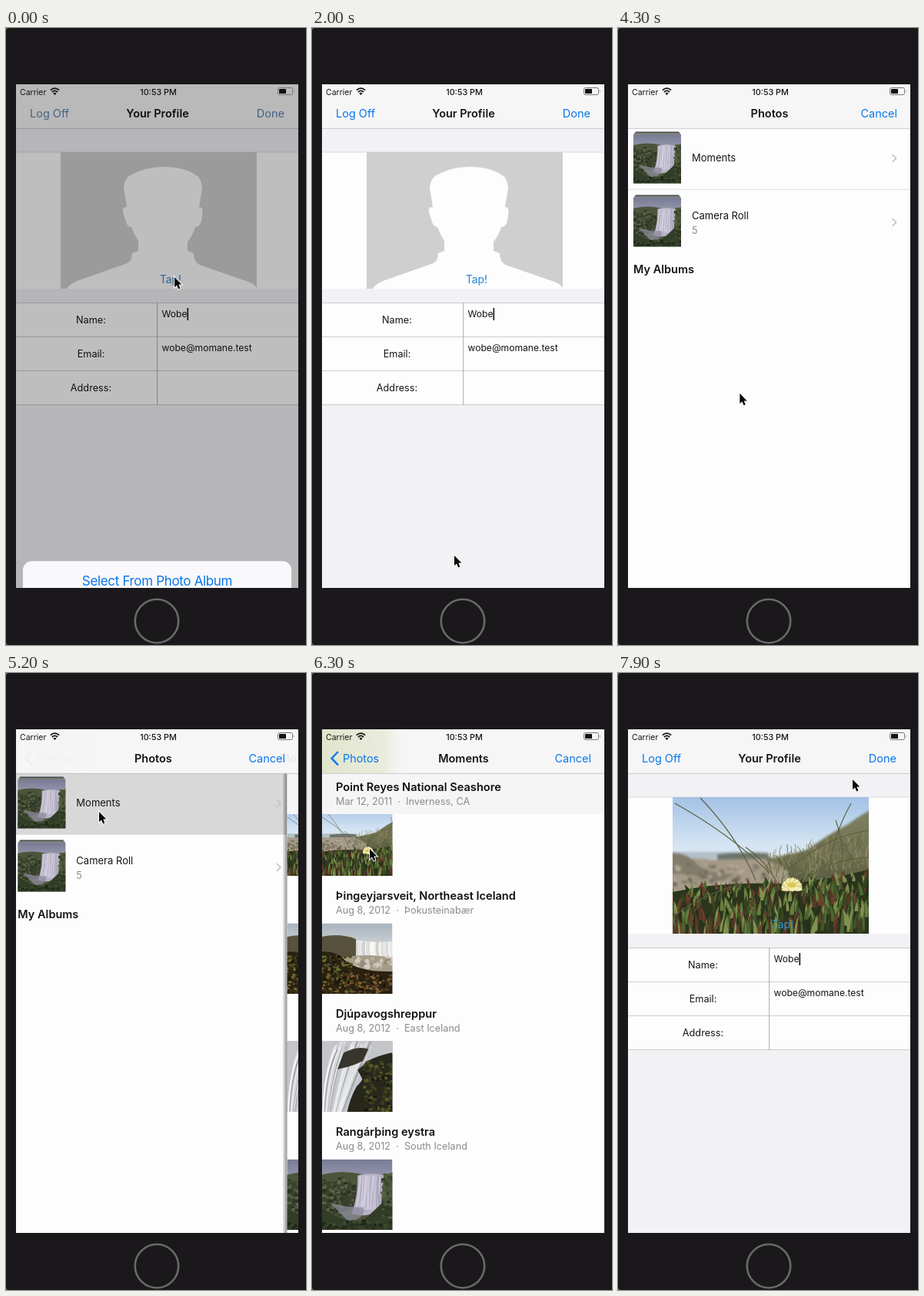
Write an HTML page that moves like this. It is 390 px wide and 800 px high and loops after 8000 ms.

```html
<!DOCTYPE html>
<html lang="en">
<head>
<meta charset="utf-8">
<title>Profile photo picker</title>
<style>
html, body { margin: 0; width: 100%; height: 100%; overflow: hidden; background: #1a181a; }
svg { display: block; }
text { font-family: Inter, Roboto, sans-serif; white-space: pre; }
</style>
</head>
<body>
<svg id="stage" width="390" height="800" viewBox="0 0 390 800" xmlns="http://www.w3.org/2000/svg"></svg>
<script>
const LOOP = 8000, STEP = 100;
const BLUE = '#0877ec', INK = '#151515', GREY = '#8b8a8e';

// ---- markup helpers ----
const rect = (x, y, w, h, fill, more = '') =>
  `<rect x="${x}" y="${y}" width="${w}" height="${h}" fill="${fill}" ${more}/>`;
const path = (d, fill, more = '') => `<path d="${d}" fill="${fill}" ${more}/>`;
const line = (d, stroke, width = 1, more = '') =>
  path(d, 'none', `stroke="${stroke}" stroke-width="${width}" ${more}`);
const text = (x, y, size, str, fill = INK, more = '') =>
  `<text x="${x}" y="${y}" font-size="${size}" fill="${fill}" ${more}>${str}</text>`;
const use = (id, x, y, w, h) => `<use href="#${id}" x="${x}" y="${y}" width="${w}" height="${h}"/>`;
const gradient = (id, ...colors) => `<linearGradient id="${id}" x2="0" y2="1">` +
  colors.map((c, i) => `<stop offset="${i / (colors.length - 1)}" stop-color="${c}"/>`).join('') +
  '</linearGradient>';
const blur = (id, size) => `<filter id="${id}"><feGaussianBlur stdDeviation="${size}"/></filter>`;
const soft = (id, body) => `<g filter="url(#${id})">${body}</g>`;
const picture = (id, w, h, body) =>
  `<symbol id="${id}" viewBox="0 0 ${w} ${h}" preserveAspectRatio="xMidYMid slice">${body}</symbol>`;
const MID = 'text-anchor="middle" ', END = 'text-anchor="end" ', BOLD = 'font-weight="600" ';

let seed = 7;
const rnd = (lo = 0, hi = 1) => {
  seed = (seed * 16807) % 2147483647;
  return lo + (hi - lo) * seed / 2147483647;
};
const pick = list => list[Math.floor(rnd() * list.length)];
const many = (n, make) => Array.from({ length: n }, (_, i) => make(i)).join('');
const num = v => v.toFixed(1);
const speckle = (n, x, y, w, h, size, colors) => many(n, () =>
  `<ellipse cx="${num(x + rnd() * w)}" cy="${num(y + rnd() * h)}" rx="${num(rnd(.4, 1) * size)}"` +
  ` ry="${num(rnd(.3, .8) * size)}" fill="${pick(colors)}"/>`);

// ---- pictures ----
function beach() {
  const leaves = ['#4c6630', '#34451f', '#687f3f', '#5c3627', '#262f17', '#6b402c', '#41552a', '#838f50'];
  const spike = i => {
    const x = rnd(-5, 260), v = i / 420;
    const y = 122 - x * .07 + v * 72, h = rnd(8, 14) + v * 14, lean = rnd(-5, 6), w = rnd(1.2, 2.8);
    return path(`M${num(x - w)} ${num(y)}Q${num(x - w)} ${num(y - h / 2)} ${num(x + lean)} ${num(y - h)}` +
      `Q${num(x + w + 1)} ${num(y - h / 2)} ${num(x + w)} ${num(y)}Z`, pick(leaves));
  };
  const tuft = () => {
    const x = rnd(125, 255), y = rnd(80, 118) - (x - 125) * .2;
    return line(`M${num(x)} ${num(y)}q${num(rnd(-5, 2))} -8 ${num(rnd(-9, 10))} ${num(rnd(-19, -7))}`,
      pick(['#757854', '#a39c74', '#565c3c', '#8b8a63']), .8);
  };
  const petals = many(14, i => `<ellipse cx="155" cy="110" rx="3" ry="9" fill="${i % 2 ? '#f3efb6' : '#ddd78c'}"` +
    ` transform="translate(0 3) rotate(${-98 + i * 15} 155 115)"/>`);
  const blades = ['M3 8Q75 48 126 98', 'M36 1Q85 52 108 108', 'M255 43Q196 52 151 94', 'M232 8Q207 52 203 100',
    'M255 78Q190 82 160 120', 'M95 65Q125 85 140 120', 'M212 30Q225 65 218 105', 'M0 155Q40 125 92 112'];
  return rect(0, 0, 255, 177, 'url(#sky)') + soft('haziness',
    rect(-5, 71, 130, 9, '#b3c0c9') + path('M58 74Q85 70 125 73V82H58Z', '#6d766c') +
    path('M95 84Q140 78 175 68Q203 48 228 35Q246 22 262 14V145H95Z', 'url(#dune)') +
    path('M-5 82Q25 77 52 81L120 80L150 95V140H-5Z', '#a59a88') +
    path('M-5 72Q18 71 30 85T80 100L60 112Q25 96 -5 100Z', '#817b6b') +
    speckle(70, 0, 84, 120, 38, 4, ['#b9ad99', '#878070', '#716e58', '#aa9f8c', '#5f6147'])) +
    many(170, tuft) + soft('focus',
    path('M-5 124Q60 110 120 112T262 92V182H-5Z', '#2b341d') + many(420, spike)) +
    blades.map(d => line(d, '#5a5d3c', 1.1)).join('') +
    petals + '<ellipse cx="155" cy="114" rx="6" ry="3.5" fill="#e0c858"/>';
}

const cascade = () => rect(0, 0, 91, 91, 'url(#haze)') + soft('focus',
  path('M-3 18Q22 12 43 20L48 26L47 48H-3Z', '#57513d') +
  path('M44 22Q68 26 94 23V46Q65 42 44 46Z', '#f0efec') +
  many(22, () => line(`M${num(rnd(46, 90))} 24q-2 9 1 20`, pick(['#ffffff', '#d8d9d8', '#c2c5c3']), 1)) +
  path('M25 44Q60 38 94 45V66H25Z', '#a69d88') +
  speckle(30, 40, 43, 50, 14, 4, ['#d0cbbf', '#b7af9b', '#958d79']) +
  path('M-3 37Q18 34 30 48Q50 64 94 62V94H-3Z', '#2b2112') +
  speckle(170, 0, 42, 38, 49, 2.6, ['#5d4d25', '#7d6834', '#3d3416', '#19150d', '#656e2f', '#444a20']) +
  speckle(130, 30, 65, 61, 26, 2.6, ['#6a4726', '#3b2815', '#836133', '#1a140c', '#4d4420']));

const rapids = () => rect(0, 0, 91, 91, '#26261d') + soft('focus',
  path('M-4 -4H55Q70 4 95 -2V14Q60 20 46 36Q60 45 45 58Q35 75 32 95H-4Z', '#c3c5c8') +
  many(48, () => {
    const x = rnd(0, 50);
    return line(`M${num(x + 15)} ${num(rnd(-4, 12))}Q${num(x)} 38 ${num(x * .55)} 95`,
      pick(['#f3f4f6', '#dadde1', '#8f9398', '#ffffff']), num(rnd(.7, 2.2)), 'opacity=".65"');
  }) +
  path('M28 15Q46 5 60 10L53 25Q38 33 20 36Z', '#37352c') +
  path('M46 37Q66 20 95 15V95H36Q41 65 54 52Z', '#27271b') +
  speckle(130, 54, 26, 41, 67, 3.4, ['#42411f', '#565728', '#171811', '#302d20', '#3a3d25']));

const falls = () => rect(0, 0, 91, 91, 'url(#dusk)') + soft('focus',
  path('M-4 21Q24 13 50 19T95 15V95H-4Z', '#4c553b') +
  path('M-4 30Q25 26 44 33L46 60L24 74L-4 62Z', '#3b432f') +
  speckle(110, 0, 24, 42, 48, 3.5, ['#4f5a3b', '#37402b', '#5b6445', '#2a3222']) +
  path('M46 21Q62 16 80 21Q78 42 75 66Q58 76 38 70Q47 48 46 21Z', '#b6b1c5') +
  many(30, () => line(`M${num(rnd(49, 77))} 21q-1 20 ${num(rnd(-7, 1))} 44`,
    pick(['#dedae8', '#9f9bb1', '#cbc7d8']), 1.4, 'opacity=".7"')) +
  path('M10 56Q28 62 54 62Q56 78 34 80Z', '#8e8b9c', 'opacity=".75"') +
  path('M-4 60Q26 82 52 80Q68 66 78 56L95 50V95H-4Z', '#323d28') +
  speckle(60, 78, 18, 16, 60, 3.2, ['#4f5b3d', '#39452c', '#5c6746', '#2b3622']) +
  speckle(60, 0, 80, 91, 12, 3.5, ['#263020', '#3c4a2b', '#1f2719']));

// ---- screens ----
const navBar = rect(13, 73, 368, 57, '#f7f6f7') + line('M13 130.3H381', '#bdbcbf', .8);
const silhouette = path('M79 338Q82 332 95 327L155 306Q164 304 164 292L172 289V276Q166 267 163 258Q157 258 155 248' +
  'Q150 235 153 233L157 232L153 207Q154 196 160 192Q180 180 204 180Q234 180 250 193Q254 197 255 208L251 232' +
  'Q257 232 255 243Q254 258 246 258Q243 269 236 277V289L244 292Q244 305 254 308L315 329Q325 333 326 338Z', '#fefdfe');

const profile = () => rect(13, 73, 368, 653, '#f2f1f4') + navBar +
  text(31, 116, 14.5, 'Log Off', BLUE, 'class="tint"') +
  text(197, 116, 14.5, 'Your Profile', INK, MID + BOLD) +
  text(362, 116, 14.5, 'Done', BLUE, 'class="tint" ' + END) +
  rect(13, 161, 368, 177, '#fefdfe') + line('M13 161H381', '#d2d1d5', .8) +
  rect(71, 161, 255, 177, '#d0cfd0') + silhouette +
  `<g id="chosen">${use('beach', 71, 161, 255, 177)}</g>` +
  text(214, 331, 13.8, 'Tap!', '#1f85db', 'id="tap" ' + MID) +
  rect(13, 356, 368, 132, '#fefdfe') +
  [356, 400, 444, 488].map(y => line(`M13 ${y + .5}H381`, '#cccbcf')).join('') +
  line('M196.7 356V489', '#aaa9ad') +
  ['Name:', 'Email:', 'Address:'].map((s, i) => text(110.5, 383 + i * 44.2, 12.7, s, INK, MID)).join('') +
  text(202.5, 375, 12.1, 'Wobe') + text(202.5, 419, 12.1, 'wobe@momane.test') +
  rect(235.5, 363, 1.6, 16, '#111', 'id="caret"');

const albumThumb = y => rect(22.5, y - 3.5, 57, 1.4, '#3b3d46') + rect(21, y - 1.8, 60, 1.5, '#555c4a') +
  use('falls', 20, y, 62, 63.5);
const chevron = y => line(`M356.5 ${y - 5}l5 5l-5 5`, '#c2c1c6', 1.7);
const albums = () => rect(13, 130, 368, 596, '#fefdfe') +
  rect(13, 130, 371, 79, '#d9d8d9', 'id="pressed"') +
  albumThumb(138) + text(96, 173, 13, 'Moments') + chevron(169) +
  line('M13 209.3H381', '#d9d8dc', .8) +
  albumThumb(220) + text(96, 248, 13, 'Camera Roll') + text(96, 267, 12.6, '5', GREY) + chevron(252) +
  text(20, 318, 14.5, 'My Albums', INK, BOLD);

const SECTIONS = [
  ['Point Reyes National Seashore', 'Mar 12, 2011', 'Inverness, CA', 'beach'],
  ['Þingeyjarsveit, Northeast Iceland', 'Aug 8, 2012', 'Þokusteinabær', 'cascade'],
  ['Djúpavogshreppur', 'Aug 8, 2012', 'East Iceland', 'rapids'],
  ['Rangárþing eystra', 'Aug 8, 2012', 'South Iceland', 'falls'],
];
const moments = () => many(14, i => rect(13 - i / 2, 130, .6, 596, '#000', `opacity="${num(.4 - i * .03)}"`)) +
  rect(13, 130, 368, 596, '#fefdfe') +
  SECTIONS.map(([title, date, place, art], i) => {
    const top = i ? 118 + i * 153 : 130;
    return use(art, 13, 171.5 + i * 153, 91.5, 91.5) +
      (i ? '' : rect(13, 130, 368, 53, '#f6f5f6')) +
      text(31, top + 23, 14.6, title, '#111', BOLD) +
      text(31, top + 41, 12.7, `${date}\u00a0\u00a0·\u00a0\u00a0${place}`, GREY);
  }).join('');

const pickerNav = () => navBar + `<g id="back">` +
  `<rect x="13" y="73" width="115" height="57" fill="url(#tinge)"/>` +
  line('M34 102l-8.5 8.7l8.5 8.7', BLUE, 2.4) + text(40, 116, 14.4, 'Photos', BLUE) + '</g>' +
  text(0, 116, 14.5, 'Photos', INK, 'id="oldTitle" ' + MID + BOLD) +
  text(0, 116, 14.5, 'Moments', INK, 'id="newTitle" ' + MID + BOLD) +
  text(363, 116, 14.5, 'Cancel', BLUE, END);

const statusBar = text(18, 86.5, 10.5, 'Carrier') +
  line('M57.8 80.6Q63.5 75.6 69.2 80.6M59.9 83Q63.5 79.9 67.1 83', '#111', 1.7) +
  path('M61.4 84.7Q63.5 83 65.6 84.7L63.5 87Z', '#111') +
  text(198, 86.5, 10.8, '10:53 PM', INK, MID + 'font-weight="500"') +
  rect(353.5, 77.5, 19, 9, 'none', 'rx="2" stroke="#777"') + rect(355, 79, 9, 6, '#111', 'rx=".6"') +
  path('M374 80.3q1.6 1.7 0 3.4Z', '#777');

const stage = document.getElementById('stage');
stage.innerHTML = '<defs>' +
  gradient('sky', '#a3c2e6', '#d3e3f2', '#eef2f5', '#e4e8e8') + gradient('dune', '#7f8163', '#6e6e50', '#434930') +
  gradient('haze', '#a9b4bf', '#e1e2df', '#c4bfb3') + gradient('dusk', '#777b94', '#b4b1c2', '#656b5c') +
  blur('haziness', 1.5) + blur('focus', .6) +
  '<linearGradient id="tinge"><stop stop-color="#d9dfbd" stop-opacity=".75"/>' +
  '<stop offset=".7" stop-color="#e3e6cf" stop-opacity=".65"/>' +
  '<stop offset="1" stop-color="#f7f6f7" stop-opacity="0"/></linearGradient>' +
  '<clipPath id="screen"><rect x="13" y="73" width="367" height="653"/></clipPath>' +
  picture('beach', 255, 177, beach()) + picture('cascade', 91, 91, cascade()) +
  picture('rapids', 91, 91, rapids()) + picture('falls', 91, 91, falls()) + '</defs>' +
  rect(0, 0, 390, 800, '#6d6c6d') + rect(0, 0, 400, 800, '#1a181a', 'rx="4"') +
  '<circle cx="196" cy="769" r="28.2" fill="none" stroke="#6a696a" stroke-width="2.6"/>' +
  `<g clip-path="url(#screen)">${profile()}` +
  `<g id="picker"><g id="albums">${albums()}</g><g id="moments">${moments()}</g>${pickerNav()}</g>` +
  rect(13, 73, 368, 653, '#000', 'id="dim"') + statusBar +
  `<g id="sheet">${rect(22, 666.5, 349, 50.7, '#f9f8fa', 'rx="11.5"')}` +
  text(196.5, 698, 17, 'Select From Photo Album', BLUE, MID + 'letter-spacing="-.02em"') + '</g></g>' +
  '<path id="pointer" d="M0 0V13.2L3 10.5L5.2 15.4L7.4 14.4L5.4 9.6H9.5Z" fill="#080808" stroke="#fff" stroke-width="2" paint-order="stroke"/>';

// ---- motion ----
const el = id => document.getElementById(id);
const set = (node, attrs) => Object.entries(attrs).forEach(([k, v]) => node.setAttribute(k, v));
const shift = (id, x, y) => set(el(id), { transform: `translate(${x.toFixed(2)} ${y.toFixed(2)})` });
const clamp = v => Math.min(1, Math.max(0, v));
const ramp = (t, from, to) => clamp((t - from) / (to - from));
const smooth = v => v * v * (3 - 2 * v);
const spring = (t, start) => {
  const x = Math.max(0, t - start) * .019;
  return 1 - (1 + x) * Math.exp(-x);
};

const TRACK = [
  [300, 219, 323], [1200, 185, 684], [3900, 185, 684], [4800, 121, 180], [5200, 121, 180],
  [5600, 121, 199], [6200, 75, 228], [7200, 75, 228], [7800, 305, 138],
];
function pointerAt(t) {
  let [, x, y] = TRACK[0];
  for (let i = 1; i < TRACK.length; i++) {
    const [from, x0, y0] = TRACK[i - 1], [to, x1, y1] = TRACK[i];
    if (t < from) break;
    const k = smooth(ramp(t, from, to));
    x = x0 + (x1 - x0) * k;
    y = y0 + (y1 - y0) * k;
  }
  return [x, y];
}

const tinted = document.querySelectorAll('.tint');
const mix = (a, b, k) => `rgb(${a.map((v, i) => Math.round(v + (b[i] - v) * k))})`;

function draw(t) {
  shift('sheet', 0, 59.5 * (1 - spring(t, -103) + spring(t, 1400)));
  const dim = ramp(t, -125, 75) * (1 - ramp(t, 1400, 1750));
  set(el('dim'), { opacity: .4 * dim });
  tinted.forEach(n => set(n, { fill: mix([8, 119, 236], [140, 140, 140], dim) }));

  const chosen = t >= 6000;
  set(el('chosen'), { visibility: chosen ? 'visible' : 'hidden' });
  set(el('tap'), { fill: chosen ? '#3199cf' : mix([31, 133, 219], [140, 140, 140], dim * .3) });
  const beat = t % 1000;
  set(el('caret'), { opacity: 1 - ramp(beat, 250, 350) * (1 - ramp(beat, 600, 700)) });

  shift('picker', 0, 653 * (1 - spring(t, 3434) + spring(t, 6649)));
  const push = spring(t, 5183);
  shift('albums', -110 * push, 0);
  shift('moments', 368 * (1 - push), 0);
  set(el('moments'), { visibility: push > 0 ? 'visible' : 'hidden' });
  set(el('pressed'), { opacity: t >= 5100 ? 1 : 0 });
  set(el('back'), { opacity: push });
  set(el('oldTitle'), { x: 197 - 133 * push, opacity: clamp(1.05 - push * 1.3) });
  set(el('newTitle'), { x: 197 + 200 * (1 - push), opacity: push });

  shift('pointer', ...pointerAt(t));
}

const began = performance.now();
let shown = -1;
function tick() {
  const step = Math.floor((performance.now() - began) % LOOP / STEP);
  if (step !== shown) draw((shown = step) * STEP);
  requestAnimationFrame(tick);
}
tick();
</script>
</body>
</html>
```
